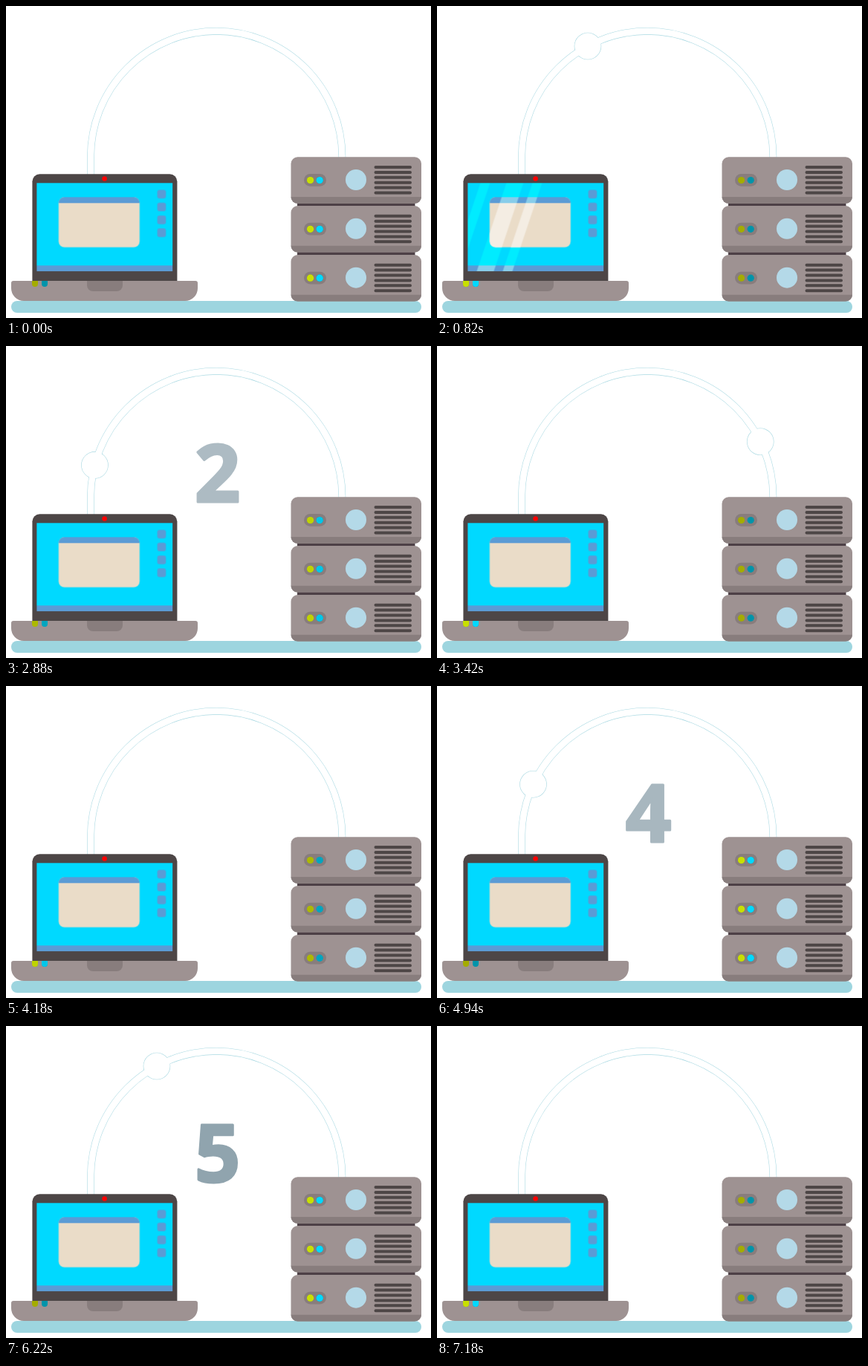
An HTML page for the animation above (7200 ms loop, 572x420 px).

```html
<!DOCTYPE html>
<html lang="en">
<head>
<meta charset="utf-8">
<title>Requests</title>
<style>
  html, body { margin: 0; width: 100%; height: 100%; overflow: hidden; background: #fff; }
  svg { display: block; width: 572px; height: 420px; }

  .body { fill: #9e9292; }
  .shade { fill: #887d7d; }
  .dark { fill: #4d4646; }
  .blue { fill: #5b9bd5; }
  .cyan { fill: #00d9ff; }
  .lime { fill: var(--lime); }
  .aqua { fill: var(--aqua); }
  .dim { --lime: #a4ac00; --aqua: #0094aa; }
  .lit { --lime: #c8e000; --aqua: #00d9ff; }

  .edge { stroke: #a9d9e2; stroke-width: 9.7; }
  .core { stroke: #fff; stroke-width: 8.6; }
  .edge circle { fill: #a9d9e2; stroke: none; }
  .core circle { fill: #fff; stroke: none; }

  /* ball: three round trips from the server, then three from the laptop */
  .ball {
    offset-path: path("M114 322 V203 A169.2 169.2 0 0 1 452.4 203 V370");
    offset-rotate: 0deg;
    animation: travel 7.2s linear infinite;
  }
  @keyframes travel {
    0%, 16.667%, 33.333%, 50%, 58.333%, 75%, 91.667% { offset-distance: 100%; }
    8.333%, 25%, 41.667%, 50.001%, 66.667%, 83.333%, 100% { offset-distance: 0%; }
  }

  .server-lit { animation: fade-out 1.2s linear infinite; }
  .laptop-lit { animation: fade-in 1.2s linear infinite; }
  @keyframes fade-out { 0%, 36% { opacity: 1; } 52.5%, 100% { opacity: 0; } }
  @keyframes fade-in { 0%, 36% { opacity: 0; } 52.5%, 100% { opacity: 1; } }

  .screen { isolation: isolate; }
  .shine {
    fill: #fff; opacity: .5; mix-blend-mode: overlay;
    animation: sweep 1.2s linear infinite;
  }
  @keyframes sweep {
    0%, 61% { transform: translateX(-12px); }
    83.4%, 100% { transform: translateX(305px); }
  }

  .count text {
    font: 700 108px "Open Sans", "Noto Sans", sans-serif;
    text-anchor: middle;
    fill: #90a4ae; stroke: #90a4ae; stroke-width: 3; stroke-linejoin: round;
    opacity: 0;
    animation: count 7.2s linear calc(var(--n) * 1.2s) infinite;
  }
  @keyframes count {
    0% { opacity: 0; }
    2.5%, 6.2% { opacity: 1; }
    8.05%, 100% { opacity: 0; }
  }
</style>
</head>
<body>
<svg viewBox="0 0 572 420">
  <defs>
    <path id="arc" fill="none" d="M114 240 V203 A169.2 169.2 0 0 1 452.4 203 V220"/>
    <clipPath id="glass"><rect x="41" y="238" width="183" height="119"/></clipPath>
    <g id="lamps">
      <circle class="lime" cx="409.6" cy="234.5" r="4.6"/>
      <circle class="aqua" cx="422.2" cy="234.5" r="4.6"/>
    </g>
    <g id="rack-lamps">
      <use href="#lamps"/>
      <use href="#lamps" y="65.8"/>
      <use href="#lamps" y="131.7"/>
    </g>
    <g id="ports">
      <path class="lime" d="M35 370 h8 v4 a4 4 0 0 1 -8 0 z"/>
      <path class="aqua" d="M48 370 h8 v4 a4 4 0 0 1 -8 0 z"/>
    </g>
    <g id="unit">
      <rect class="body" x="383.5" y="203.3" width="175.5" height="62.5" rx="9"/>
      <path class="shade" d="M383.5 257 H559 A9 8.8 0 0 1 550 265.8 H392.5 A9 8.8 0 0 1 383.5 257 z"/>
      <rect class="shade" x="401" y="226" width="30" height="16.8" rx="8.4"/>
      <circle cx="471" cy="234" r="14" fill="#b4d9e8"/>
      <path d="M497.5 217 h46.5 m-46.5 6.9 h46.5 m-46.5 6.9 h46.5 m-46.5 6.9 h46.5 m-46.5 6.9 h46.5 m-46.5 6.9 h46.5"
            stroke="#4d4646" stroke-width="4" stroke-linecap="round"/>
    </g>
  </defs>

  <!-- connection -->
  <g class="edge">
    <use href="#arc"/>
    <circle class="ball" r="18.3"/>
  </g>
  <g class="core">
    <use href="#arc"/>
    <circle class="ball" r="17.7"/>
  </g>

  <g class="count">
    <text x="284.5" y="210" style="--n:1">1</text>
    <text x="284.5" y="210" style="--n:2">2</text>
    <text x="284.5" y="210" style="--n:3">3</text>
    <text x="284.5" y="210" style="--n:4">4</text>
    <text x="284.5" y="210" style="--n:5">5</text>
  </g>

  <rect x="7" y="397" width="552" height="16" rx="8" fill="#9dd5df"/>

  <!-- laptop -->
  <g transform="translate(.4 .3)">
    <path class="dark" d="M35 370 V236 a10 10 0 0 1 10 -10 H220 a10 10 0 0 1 10 10 V370 z"/>
    <circle cx="132.2" cy="232.2" r="3.3" fill="#f00"/>
    <g class="screen" clip-path="url(#glass)">
      <rect class="cyan" x="41" y="238" width="183" height="119"/>
      <rect class="blue" x="41" y="349" width="183" height="8"/>
      <rect x="70.4" y="257" width="109" height="67.5" rx="8" fill="#eadcc8"/>
      <path class="blue" d="M70.4 265 a8 8 0 0 1 8 -8 h93 a8 8 0 0 1 8 8 z"/>
      <g class="blue">
        <rect x="203.2" y="247.2" width="11.6" height="11.6" rx="3"/>
        <rect x="203.2" y="264.5" width="11.6" height="11.6" rx="3"/>
        <rect x="203.2" y="281.8" width="11.6" height="11.6" rx="3"/>
        <rect x="203.2" y="299.1" width="11.6" height="11.6" rx="3"/>
      </g>
      <path class="shine" d="M-35 238 h13 l-40 119 h-13 z M0 238 h23 l-40 119 h-23 z M35 238 h13 l-40 119 h-13 z"/>
    </g>
  </g>
  <path class="body" d="M7 373 a3 3 0 0 1 3 -3 H255 a3 3 0 0 1 3 3 V380 a17 17 0 0 1 -17 17 H24 a17 17 0 0 1 -17 -17 z"/>
  <path class="shade" d="M109 370 h48 v6 a8 8 0 0 1 -8 8 h-32 a8 8 0 0 1 -8 -8 z"/>
  <g class="dim"><use href="#ports"/></g>
  <g class="lit laptop-lit"><use href="#ports"/></g>

  <!-- server -->
  <rect x="392" y="264" width="158.5" height="7" fill="#4d4046"/>
  <rect x="392" y="330" width="158.5" height="7" fill="#4d4046"/>
  <use href="#unit"/>
  <use href="#unit" y="65.8"/>
  <use href="#unit" y="131.7"/>
  <g class="dim"><use href="#rack-lamps"/></g>
  <g class="lit server-lit"><use href="#rack-lamps"/></g>
</svg>
</body>
</html>
```
